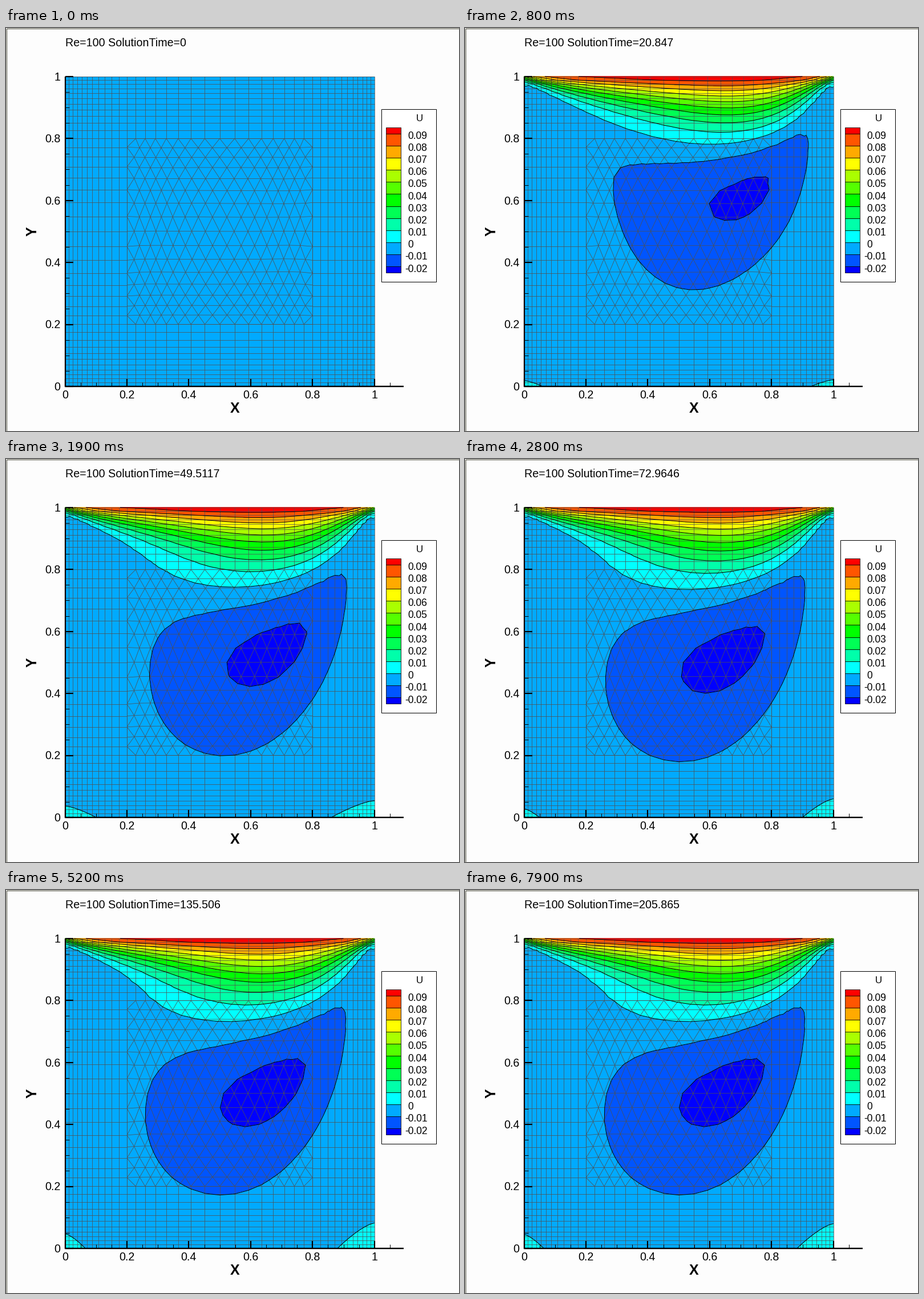
Animation, 794 px wide and 705 px high, one loop 8000 ms. Source, as a matplotlib script:

```python
import numpy as np
import matplotlib.pyplot as plt
from matplotlib.animation import FuncAnimation
from matplotlib.collections import LineCollection
from matplotlib.patches import Polygon, Rectangle
from matplotlib.tri import Triangulation

plt.rcParams["font.family"] = "Liberation Sans"

W, H = 794, 705
FRAMES, STEP = 80, 2.60588          # frames per loop, solution time per frame
STEADY = 50                         # the flow no longer changes after this
X0, Y0, SIZE = 103.5, 627, 542.3    # plot origin and side in pixels
LEVELS = np.arange(-2, 10) / 10     # u relative to the lid speed
COLORS = ["#0000ff", "#0055ff", "#00aaff", "#00ffff", "#00ffaa", "#00ff55",
          "#00ff00", "#55ff00", "#aaff00", "#ffff00", "#ffaa00", "#ff5500",
          "#ff0000"]


def px(x):
    return X0 + SIZE * np.asarray(x)


def py(y):
    return Y0 - SIZE * np.asarray(y)


# ---- mesh: stretched quads around a block of triangles ----

def wall_grid(half=19, ratio=1.0805):
    g = (ratio ** np.arange(half + 1) - 1) / (ratio ** half - 1) / 2
    return np.concatenate([g, 1 - g[-2::-1]])


def block_points(s):
    """Boundary points first, then staggered and smoothed inner points."""
    lo, hi = s[0], s[-1]
    edge = [(x, y) for x in s for y in (lo, hi)]
    edge += [(x, y) for y in s[1:-1] for x in (lo, hi)]
    mids = (s[1:] + s[:-1]) / 2
    inner = [(x, s[j]) for j in range(1, len(s) - 1)
             for x in (mids[1:-1] if j % 2 else s[1:-1])]
    n = len(edge)
    p = np.array(edge + inner)
    p[n:] += np.random.default_rng(4).uniform(-0.004, 0.004, (len(inner), 2))
    for _ in range(3):
        a, b = Triangulation(*p.T).edges.T
        total = np.zeros_like(p)
        np.add.at(total, a, p[b])
        np.add.at(total, b, p[a])
        count = np.bincount(np.concatenate([a, b]), minlength=len(p))
        p[n:] = total[n:] / count[n:, None]
    return p, n


grid = wall_grid()
A, B = 11, 27                       # grid indices of the block sides
lo, hi = grid[A], grid[B]
block, n_edge = block_points(grid[A:B + 1])

ring = [(x, y) for i, x in enumerate(grid) for j, y in enumerate(grid)
        if not (A < i < B and A < j < B)]
nodes = np.vstack([ring, block[n_edge:]])
mesh = Triangulation(px(nodes[:, 0]), py(nodes[:, 1]))

segments = []
for i, g in enumerate(grid):
    spans = [(0, lo), (hi, 1)] if A < i < B else [(0, 1)]
    for a, b in spans:
        segments += [[(g, a), (g, b)], [(a, g), (b, g)]]
segments += list(block[Triangulation(*block.T).edges])
segments = [np.column_stack([px(np.array(s)[:, 0]), py(np.array(s)[:, 1])])
            for s in segments]


# ---- flow: lid-driven cavity, vorticity and stream function ----

def solve(n=64, sub=80, nu=0.01):
    """Yield the horizontal velocity on an (n+1)^2 grid, one per frame."""
    h, dt = 1 / n, STEP / 10 / sub
    k = np.arange(1, n)
    S = np.sqrt(2 / n) * np.sin(np.pi * np.outer(k, k) / n)
    lam = (2 - 2 * np.cos(np.pi * k / n)) / h ** 2
    lam = lam[:, None] + lam[None, :]
    psi = np.zeros((n + 1, n + 1))
    w = np.zeros_like(psi)
    u = np.zeros_like(psi)
    yield u.copy()
    u[-1] = 1
    u[-1, [0, -1]] = 0.5
    for _ in range(STEADY):
        for _ in range(sub):
            w[0] = -2 * psi[1] / h ** 2
            w[:, 0] = -2 * psi[:, 1] / h ** 2
            w[:, -1] = -2 * psi[:, -2] / h ** 2
            w[-1] = -2 * (psi[-2] + h) / h ** 2
            up, down = w[2:, 1:-1], w[:-2, 1:-1]
            right, left = w[1:-1, 2:], w[1:-1, :-2]
            mid = w[1:-1, 1:-1]
            uu = (psi[2:, 1:-1] - psi[:-2, 1:-1]) / (2 * h)
            vv = (psi[1:-1, :-2] - psi[1:-1, 2:]) / (2 * h)
            rate = nu * (up + down + right + left - 4 * mid) / h ** 2
            rate -= (uu * (right - left) + vv * (up - down)) / (2 * h)
            w[1:-1, 1:-1] = mid + dt * rate
            psi[1:-1, 1:-1] = S @ ((S @ w[1:-1, 1:-1] @ S) / lam) @ S
        u[1:-1, 1:-1] = (psi[2:, 1:-1] - psi[:-2, 1:-1]) / (2 * h)
        yield u.copy()


def sampler(pts, n):
    """Bilinear lookup; wall nodes read the centre of the first cell."""
    c = grid[1] / 2
    q = np.clip(pts, c, 1 - c) * n
    i = q.astype(int)
    (fx, fy), (ix, iy) = (q - i).T, i.T

    def sample(u):
        low = u[iy, ix] * (1 - fx) + u[iy, ix + 1] * fx
        high = u[iy + 1, ix] * (1 - fx) + u[iy + 1, ix + 1] * fx
        return low * (1 - fy) + high * fy
    return sample


flow = list(solve())
at_nodes = sampler(nodes, len(flow[0]) - 1)
# Damp the strong return flow so that its steady mid-line peak is -0.2.
damp = 0.1 / (-flow[-1][:, flow[-1].shape[1] // 2].min() - 0.1)
low_part = nodes[:, 1] < 0.35


def node_field(u):
    f = at_nodes(u) - 1e-5
    f = np.where(f < -0.1, -0.1 + (f + 0.1) * damp, f)
    f[low_part] = np.minimum(f[low_part], -1e-5)
    return f


fields = [node_field(u) for u in flow]

# Corner eddies: width and height over the frames
KEYS = [5, 12, 28, 42, 60]
LEFT = [(0, .140, .050, .068, .064), (0, .044, .028, .050, .045)]
RIGHT = [(0, .170, .100, .122, .118), (0, .050, .060, .085, .080)]


def eddy_curve(n, size, wall, side):
    w, h = (np.interp(n, KEYS, s) for s in size)
    s = np.linspace(0, 1, 9)
    return np.column_stack([px(wall + side * w * s), py(h * (1 - s ** 1.4))])


# ---- stage ----

fig = plt.figure(figsize=(W / 72, H / 72), dpi=72, facecolor="#fdfdfd")
ax = fig.add_axes([0, 0, 1, 1])
ax.set_xlim(0, W)
ax.set_ylim(H, 0)
ax.axis("off")


def line(x, y, lw, color="black", z=5):
    return ax.plot(x, y, color=color, lw=lw, zorder=z,
                   solid_capstyle="butt")[0]


def label(x, y, s, size, ha="center", **kw):
    """Text whose capitals are centred on y."""
    return ax.text(x, y + 0.355 * size, s, size=size, ha=ha,
                   va="baseline", zorder=6, **kw)


def box(x, y, w, h, fill, lw=1, edge="black"):
    ax.add_patch(Rectangle((x, y), w, h, fc=fill, ec=edge, lw=lw, zorder=4))


box(0.5, 0.5, W - 1, H - 1, "none", edge="#3c3c2c")
ax.add_collection(LineCollection(segments, colors="#505050", linewidths=0.75,
                                 zorder=2))

# axes and ticks
line([X0, X0], [84.5, Y0 + 1], 2.2)
line([X0 - 1, 697], [Y0, Y0], 2.4)
for i in range(22):
    major = i % 4 == 0
    x, y = px(i / 20), py(i / 20)
    lw = 2.2 if major else 1
    line([x, x], [Y0, Y0 - (13 if major else 7)], lw)
    if i <= 20:
        line([X0, X0 + (14 if major else 7)], [y, y], lw)
    if major:
        label(x, 641.5, f"{i / 20:g}", 19.6)
        label(95.5, y, f"{i / 20:g}", 19.6, ha="right")
label(401, 664, "X", 25, weight="bold")
ax.text(47, 356, "Y", size=25, weight="bold", rotation=90,
        ha="center", va="center", zorder=6)
title = label(103.5, 25, "", 19.65, ha="left")

# legend
box(658, 141.5, 95.5, 302, "white")
label(725, 156.5, "U", 17)
CELL = 21.16
bounds = np.concatenate([[428], 417.3 - CELL * np.arange(12), [174]])
for c, y1, y0 in zip(COLORS, bounds, bounds[1:]):
    box(666, y0, 26, y1 - y0, c, lw=0.8)
for i, v in enumerate(LEVELS):
    label(704.5 if v >= 0 else 699, 420.3 - CELL * i, f"{v / 10:g}", 17.5,
          ha="left")

# corner eddies
eddies = []
for size, wall, side in ((LEFT, 0, 1), (RIGHT, 1, -1)):
    patch = Polygon([(0, 0)] * 3, fc=COLORS[3], ec="none", zorder=1.5)
    ax.add_patch(patch)
    eddies.append((size, wall, side, patch, line([], [], 1, z=3)))

bands = []


def draw(n):
    while bands:
        bands.pop().remove()
    f = fields[min(n, STEADY)]
    bands.append(ax.tricontourf(mesh, f, [-9, *LEVELS, 9], colors=COLORS,
                                zorder=1))
    if n:
        bands.append(ax.tricontour(mesh, f, LEVELS, colors="black",
                                   linestyles="solid", linewidths=1,
                                   zorder=3))
    for size, wall, side, patch, rim in eddies:
        curve = eddy_curve(n, size, wall, side)
        shown = n > KEYS[0]
        patch.set_xy(np.vstack([curve, [px(wall), Y0]]))
        patch.set_visible(shown)
        rim.set_data(*curve.T)
        rim.set_visible(shown)
    title.set_text(f"Re=100 SolutionTime={n * STEP:.6g}")
    return []


anim = FuncAnimation(fig, draw, frames=FRAMES, interval=100,
                     init_func=lambda: [], repeat=True)
plt.show()
```
